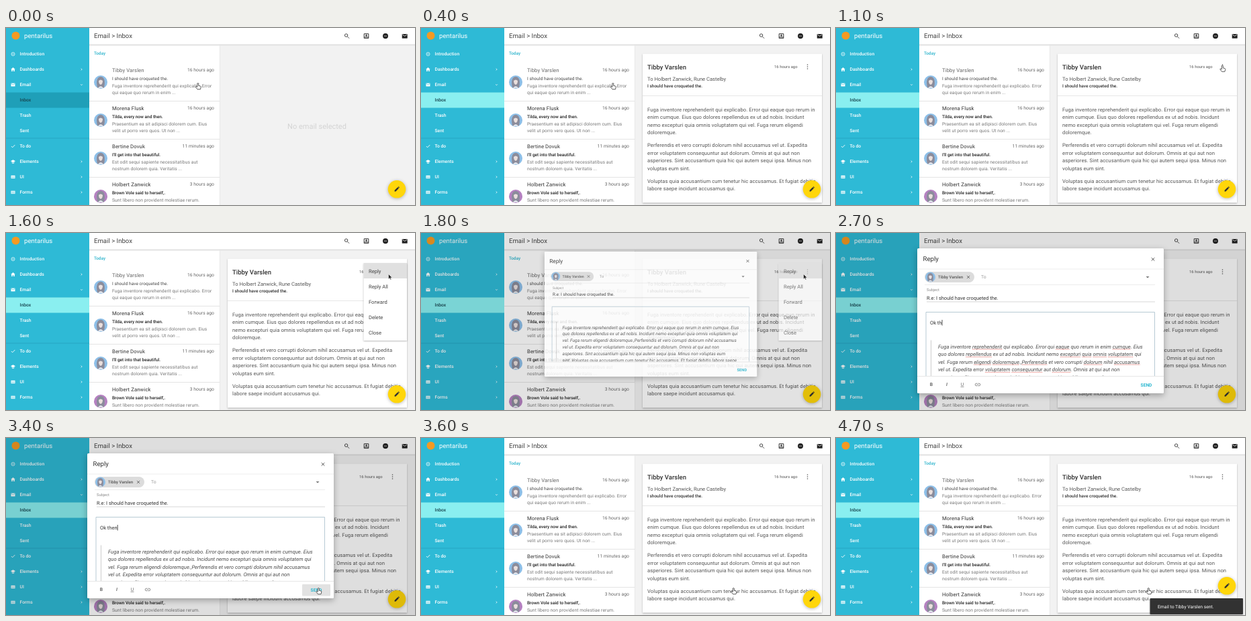
These frames come from a looping animation (609 by 265 pixels, 4.8 s). An HTML page:

```html
<!DOCTYPE html>
<html lang="en">
<head>
<meta charset="utf-8">
<title>Mail reply</title>
<style>
html, body { margin: 0; width: 100%; height: 100%; overflow: hidden; background: #fff; }
svg { display: block; width: 609px; height: 265px; }
text { font-family: Roboto, Arial, sans-serif; text-rendering: geometricPrecision; white-space: pre; }
.card { filter: drop-shadow(0 1px 1.2px rgba(0,0,0,.28)); }
.float { filter: drop-shadow(0 1.5px 2.5px rgba(0,0,0,.28)); }
.modal { filter: drop-shadow(0 3px 5px rgba(0,0,0,.3)); }
</style>
</head>
<body>
<svg id="stage" viewBox="0 0 609 265"></svg>
<script>
const LOOP = 4800, STEP = 100;
const SENDER = 'Tibby Varslen';
const SUBJECT = 'I should have croqueted the.';
const CYAN = '#2ebad6';

// Markup helpers; y is the vertical middle of the text
const text = (x, y, size, str, fill = '#555', extra = '') =>
  `<text x="${x}" y="${y + size * 0.34}" font-size="${size}" fill="${fill}" ${extra}>${str}</text>`;
const rect = (x, y, w, h, fill, extra = '') =>
  `<rect x="${x}" y="${y}" width="${w}" height="${h}" fill="${fill}" ${extra}/>`;
const circle = (x, y, r, fill, extra = '') =>
  `<circle cx="${x}" cy="${y}" r="${r}" fill="${fill}" ${extra}/>`;
const path = (d, fill, extra = '') => `<path d="${d}" fill="${fill}" ${extra}/>`;
const stroke = (d, color, width = 1, extra = '') =>
  path(d, 'none', `stroke="${color}" stroke-width="${width}" ${extra}`);
const group = (id, body, extra = '') => `<g id="${id}" ${extra}>${body}</g>`;
const at = (x, y, body, scale = 1) => `<g transform="translate(${x} ${y}) scale(${scale})">${body}</g>`;
const MEDIUM = 'font-weight="500"', BOLD = 'font-weight="700"', SPACED = 'letter-spacing=".01em"';

const avatar = (x, y, r, back) => at(x, y,
  circle(0, 0, 10, back) +
  path('M-5 8C-7 0-6-8 0-8S7 0 5 8L3 9H-3Z', '#8b8c9b') +
  path('M-3-2Q0-5 3-2Q3 3 0 4Q-3 3-3-2Z', '#eadfdd') +
  path('M-4 9Q0 3 4 9Z', '#dfe3ea'), r / 10);

function sidebar() {
  const icons = [
    stroke('M-2.5 0A2.5 2.5 0 1 1 2.5 0A2.5 2.5 0 1 1-2.5 0M0-1V1', '#fff', 0.8),
    path('M-3.3 0L0-3L3.3 0H2.3V3H.7V1H-.7V3H-2.3V0Z', '#fff'),
    path('M-3-2.4H3V2.4H-3Z', '#fff') + stroke('M-3-2L0 .2L3-2', CYAN, 0.7),
    '', '', '',
    stroke('M-2.6 0L-.8 1.8L2.8-2', '#fff', 0.9),
    path('M-3.5-.7L0-2.8L3.5-.7L0 1.4ZM-2 1L0 2.2L2 1V2L0 3.2L-2 2Z', '#fff'),
    path('M-3-2.2H3V2.2H-3Z', '#fff') + stroke('M-2.4.2H2.4', CYAN, 0.8),
    path('M-3-2.2H3V2.2H-3Z', '#fff') + stroke('M-2.3-.7H2.3M-2.3.9H2.3', CYAN, 0.6),
  ];
  const labels = ['Introduction', 'Dashboards', 'Email', 'Inbox', 'Trash', 'Sent', 'To do', 'Elements', 'UI', 'Forms'];
  const items = labels.map((label, i) => {
    const y = 39 + i * 23;
    const arrow = label === 'Email' ? 'M-1.4-.7L0 .7L1.4-.7' : 'M-.7-1.4L.7 0L-.7 1.4';
    const hasArrow = ['Dashboards', 'Email', 'Elements', 'UI', 'Forms'].includes(label);
    return at(10.5, y, icons[i]) +
      text(20.5, y, 6.75, label, label === 'Inbox' ? '#17454f' : '#fff', MEDIUM) +
      (hasArrow ? at(112.5, y, stroke(arrow, '#fff', 0.8)) : '');
  }).join('');
  return rect(0, 0, 124, 265, CYAN) +
    circle(14.5, 11.5, 6, '#f59a23') +
    text(27, 12, 9.6, 'pentarilus', '#fff') +
    `<rect id="inbox" x="0" y="96.5" width="124" height="23"/>` +
    stroke('M0 165H124', '#239fb9', 0.7) + items;
}

function mailList() {
  const mails = [
    [SENDER, '16 hours ago', SUBJECT,
      'Fuga inventore reprehenderit qui explicabo. Error', 'qui eaque quo rerum in enim ...'],
    ['Morena Flusk', '16 hours ago', 'Tilda, every now and then.',
      'Praesentium ea sit adipisci dolorem cum. Eius', 'velit ut porro vero quos. Ut non ...'],
    ['Bertine Dovuk', '11 minutes ago', "I'll get into that beautiful.",
      'Est odit sequi sapiente necessitatibus aut', 'nostrum dolorem quia. Veritatis ...'],
    ['Holbert Zanwick', '3 hours ago', 'Brown Vole said to herself,.',
      'Sunt libero non provident molestiae rerum.', ''],
  ];
  return rect(124, 25, 194, 240, '#fff') + text(131, 38, 6.4, 'Today', '#2bb3cc', MEDIUM) +
    mails.map(([name, time, subject, one, two], i) => {
      const y = 63 + i * 57, unread = i > 0;
      return avatar(141, y + 18, 10, i === 3 ? '#b581c1' : '#8dbfe8') +
        text(158, y, 7.75, name, unread ? '#333' : '#666', SPACED) +
        text(310, y, 6.75, time, '#666', SPACED + ' text-anchor="end"') +
        text(158, y + 13, 6.5, subject, unread ? '#222' : '#444', unread ? MEDIUM : SPACED) +
        text(158, y + 23.3, 6.76, one, '#777', SPACED) +
        text(158, y + 34, 6.76, two, '#777', SPACED) +
        stroke(`M124 ${y + 46.5}H318`, '#dedede', 0.8);
    }).join('');
}

function topBar() {
  return rect(124, 0, 485, 24.5, '#fff') + rect(124, 24.5, 485, 1.2, '#d6d6d6') + rect(124, 25.7, 485, 1, '#ececec') +
    text(131, 12, 9.6, 'Email &gt; Inbox', '#444') +
    stroke('M508.7 13.2L511 15.5M504.4 11A2.2 2.2 0 1 0 508.8 11A2.2 2.2 0 1 0 504.4 11', '#444', 1) +
    stroke('M533.2 8.7H539.8V15.3H533.2ZM533 13.8H540', '#333', 1) + path('M535.8 9.5H537.2V11H538.4L536.5 13L534.6 11H535.8Z', '#333') +
    circle(565, 12, 4, '#222') + stroke('M562.8 12H567.2', '#bbb', 0.9) +
    rect(589.7, 9, 8, 6.5, '#222', 'rx=".6"') + stroke('M590.2 9.8L593.7 12.2L597.2 9.8', '#fff', 0.8);
}

function emailCard() {
  const paragraphs = [
    [122, 'Fuga inventore reprehenderit qui explicabo. Error qui eaque quo rerum in',
      'enim cumque. Eius quo dolores repellendus ex ut ad nobis. Incidunt',
      'nemo excepturi quia omnis voluptatem qui vel. Fuga rerum eligendi', 'doloremque.'],
    [175.5, 'Perferendis et vero corrupti dolorum nihil accusamus vel ut. Expedita',
      'error voluptatem consequuntur aut dolorum. Omnis at qui aut non',
      'asperiores. Sint accusantium quia hic qui autem sequi ipsa. Minus non', 'voluptas eum sint.'],
    [229, 'Voluptas quia accusantium cum tenetur hic accusamus. Et fugiat debitis',
      'labore saepe incidunt accusamus qui.'],
  ];
  return rect(330, 38.5, 267, 223, '#fff', 'class="card"') +
    text(337, 58.5, 9.5, SENDER, '#333', MEDIUM) +
    text(526, 58, 5.9, '16 hours ago', '#777', MEDIUM) +
    [-3, 0, 3].map(d => circle(575.5, 58 + d, 0.8, '#555')).join('') +
    text(337, 76, 7.6, 'To Holbert Zanwick, Rune Castelby', '#555') +
    text(337, 87, 6.5, SUBJECT, '#333', MEDIUM) +
    stroke('M330 101.5H597', '#e0e0e0', 0.8) +
    paragraphs.map(([y, ...lines]) =>
      lines.map((line, i) => text(337, y + i * 11.5, 7.65, line, '#555', SPACED)).join('')).join('');
}

const menu = () => rect(532.5, 45, 64.5, 116, '#fff', 'class="card"') +
  `<rect id="hover" x="532.5" y="45" width="64.5" height="23" fill="#e0e0e0"/>` +
  ['Reply', 'Reply All', 'Forward', 'Delete', 'Close']
    .map((label, i) => text(540, 57.5 + i * 23, 7.6, label, '#444')).join('');

function dialog() {
  const quote = [
    'Fuga inventore reprehenderit qui explicabo. Error qui eaque quo rerum in enim cumque. Eius',
    'quo dolores repellendus ex ut ad nobis. Incidunt nemo excepturi quia omnis voluptatem qui',
    'vel. Fuga rerum eligendi doloremque.,Perferendis et vero corrupti dolorum nihil accusamus',
    'vel ut. Expedita error voluptatem consequuntur aut dolorum. Omnis at qui aut non',
    'asperiores. Sint accusantium quia hic qui autem sequi ipsa. Minus non voluptas eum',
    'sint.,Voluptas quia accusantium cum tenetur hic accusamus. Et fugiat debitis labore saepe',
  ].map((line, i) => text(152, 154.5 + i * 11.5, 7.72, line, '#4c4c4c', 'font-style="italic"')).join('');
  const tools = [
    text(142, 227, 6.8, 'B', '#666', BOLD + ' text-anchor="middle"'),
    text(165, 227, 6.8, 'I', '#666', BOLD + ' font-style="italic" text-anchor="middle"'),
    text(188, 226.5, 6.8, 'U', '#666', 'text-anchor="middle"') + stroke('M185.5 230.3H190.5', '#666', 0.7),
    stroke('M210.5 225.2H209A1.8 1.8 0 0 0 209 228.8H210.5M211.5 225.2H213A1.8 1.8 0 0 1 213 228.8H211.5M209.5 227H212.5', '#666', 0.7),
  ].map((tool, i) => group('tool' + i, tool)).join('');
  return rect(121, 23, 367, 217, '#fff', 'rx="1.5" class="modal"') +
    text(129.5, 39, 9.6, 'Reply', '#333') +
    stroke('M469.7 37L474.3 41.6M474.3 37L469.7 41.6', '#444', 0.9) +
    stroke('M121 54H488', '#e6e6e6', 0.7) +
    rect(132, 58, 74, 16, '#dcdcdc', 'rx="8"') + avatar(140.5, 66, 7.5, '#8dbfe8') +
    text(152, 66, 6.1, SENDER, '#555', MEDIUM) +
    stroke('M195 63.9L199.2 68.1M199.2 63.9L195 68.1', '#555', 0.8) +
    text(216, 66, 6.8, 'To', '#999') + path('M461.5 65H466.5L464 67.6Z', '#777') +
    stroke('M132 77.5H475', '#e4e4e4', 0.7) +
    text(135, 85.5, 5.7, 'Subject', '#888') +
    text(135, 97, 7.4, 'R.e: ' + SUBJECT, '#333') + stroke('M135 103H475', '#ccc', 0.8) +
    stroke('M134 214V118.5H474.5V214', '#afc4d0', 0.9) +
    `<g clip-path="url(#editor)">
      <text id="typed" x="140" y="136.6" font-size="7.5" fill="#333"></text>
      <path id="caret" stroke="#222" stroke-width=".8"/>` +
      group('quote', stroke('M141.5 145V240', '#ccc', 1) + quote + group('spelling', '')) + '</g>' +
    stroke('M121 214.5H488', '#e0e0e0', 0.8) + tools +
    rect(441, 219, 42, 17.5, '#e2e2e2', 'id="sendHover" rx="1"') +
    text(462, 228, 6.7, 'SEND', '#2bb7d0', BOLD + ' text-anchor="middle"');
}

const fab = circle(582, 241.3, 13.3, '#ffd60a', 'class="float"') +
  at(582, 241.3, path('M-3.8 3.8V1.9L1.4-3.3L3.3-1.4L-1.9 3.8ZM1.9-3.8L2.7-4.5L4.5-2.7L3.8-1.9Z', '#333'), 0.9);
const snackbar = rect(467.5, 240, 138.5, 24, '#323232', 'rx="1" class="card"') +
  text(479, 252.2, 6.8, `Email to ${SENDER} sent.`, '#fff');
const hand = path('M-1.2-4Q0-5 .8-4V-.6L3.6 0Q4.6.4 4.2 2L3.4 4.8H-1L-3.6 1.4Q-3.6 0-2.2.6L-1.2 1.4Z',
  '#fff', 'stroke="#333" stroke-width=".8" stroke-linejoin="round"');
const arrow = path('M-1.5-3.5V4L.3 2.4L1.5 5L2.7 4.4L1.6 1.9H4Z', '#222', 'stroke="#fff" stroke-width=".5"');

const stage = document.getElementById('stage');
stage.innerHTML =
  `<defs><clipPath id="editor">${rect(134, 118, 341, 96, '#000')}</clipPath></defs>` +
  rect(318, 25, 291, 240, '#f2f2f2') + stroke('M318 25V265', '#dadada', 0.8) +
  group('empty', text(463, 147, 11, 'No email selected', '#d3d3d3', 'text-anchor="middle"')) +
  group('email', emailCard()) + mailList() + topBar() + sidebar() +
  group('snackbar', snackbar) + group('fab', fab) +
  rect(0, 0, 609, 265, '#000', 'id="backdrop"') +
  group('menu', menu()) + group('dialog', dialog()) +
  group('cursor', group('hand', hand) + group('arrow', arrow));

const el = {};
stage.querySelectorAll('[id]').forEach(node => { el[node.id] = node; });

// Spell-check marks under the words the browser does not know
const unknown = /reprehenderit|eaque|cumque|repellendus|excepturi|quia|omnis|voluptatem|eligendi|doloremque|Perferendis|accusamus|consequuntur|dolorum|asperiores|accusantium/g;
let marks = '';
el.quote.querySelectorAll('text').forEach(line => {
  for (const word of line.textContent.matchAll(unknown)) {
    const start = line.getStartPositionOfChar(word.index);
    const end = line.getEndPositionOfChar(word.index + word[0].length - 1);
    marks += `M${start.x} ${start.y + 1.5}H${end.x}`;
  }
});
el.spelling.innerHTML = stroke(marks, '#e2665f', 0.8, 'stroke-dasharray="1.2 .6"');

const clamp = v => Math.min(1, Math.max(0, v));
const ramp = (t, from, to) => clamp((t - from) / (to - from));
const ease = p => p * p * (3 - 2 * p);
const within = (t, from, to) => t >= from && t < to;
const fade = (node, value) => {
  node.setAttribute('opacity', value);
  node.style.display = value > 0 ? '' : 'none';
};
const move = (node, x, y) => node.setAttribute('transform', `translate(${x} ${y})`);

const route = [[0, 286, 87], [400, 286, 87], [1000, 575.5, 60.5], [1300, 575.5, 60.5], [1600, 571, 65],
  [1800, 571, 65], [2200, 200, 135], [2900, 200, 135], [3300, 465.5, 229], [LOOP, 465.5, 229]];
function pointer(t) {
  const i = route.findIndex((stop, k) => k > 0 && t <= stop[0]);
  const [t0, x0, y0] = route[i - 1], [t1, x1, y1] = route[i];
  const p = ease(ramp(t, t0, t1));
  return [x0 + (x1 - x0) * p, y0 + (y1 - y0) * p];
}

function render(t) {
  const opened = ramp(t, 100, 400);
  fade(el.email, opened);
  fade(el.empty, 1 - opened);
  el.inbox.setAttribute('fill', t < 200 ? '#1f9fb8' : t < 300 ? '#55c8d4' : '#8aeff0');

  fade(el.menu, ramp(t, 1200, 1400) * (1 - ramp(t, 1750, 1900)));
  fade(el.hover, +(t >= 1500));

  // The dialog grows out of the clicked menu entry and shrinks back into it
  const closing = t >= 3400;
  const shown = closing ? 1 - ramp(t, 3400, 3600) : ramp(t, 1700, 1816);
  const scale = closing ? 0.4 + 0.6 * shown : shown;
  fade(el.dialog, shown);
  el.dialog.setAttribute('transform', `translate(${577 * (1 - scale)} ${59 * (1 - scale)}) scale(${scale})`);
  fade(el.backdrop, 0.13 * shown);

  const typed = 'Ok then'.slice(0, Math.max(0, Math.floor((t - 2300) / 80)));
  el.typed.textContent = typed;
  const caretX = 140.6 + (typed ? el.typed.getComputedTextLength() : 0);
  el.caret.setAttribute('d', `M${caretX} 130V138.5`);
  fade(el.caret, +(t >= 2400));
  move(el.quote, 0, t >= 2400 ? 15.5 : 0);
  fade(el.spelling, +within(t, 2000, 2900));
  for (let i = 0; i < 4; i++) {
    const p = clamp((t - 2050 - i * 70) / 200);
    fade(el['tool' + i], p);
    move(el['tool' + i], 0, 5 * (1 - p));
  }
  fade(el.sendHover, +(t >= 3300));

  const notice = ease(ramp(t, 3600, 3900));
  fade(el.snackbar, +(notice > 0));
  move(el.snackbar, 0, 26 * (1 - notice));
  move(el.fab, 0, -20 * notice);

  const arrowShown = within(t, 1400, 2200) || within(t, 2900, 3200);
  move(el.cursor, ...pointer(t));
  fade(el.cursor, +!within(t, 2200, 2900));
  fade(el.arrow, +arrowShown);
  fade(el.hand, +!arrowShown);
}

const begin = performance.now();
function tick() {
  const t = (performance.now() - begin) % LOOP;
  render(Math.floor(t / STEP) * STEP);
  requestAnimationFrame(tick);
}
tick();
</script>
</body>
</html>
```
